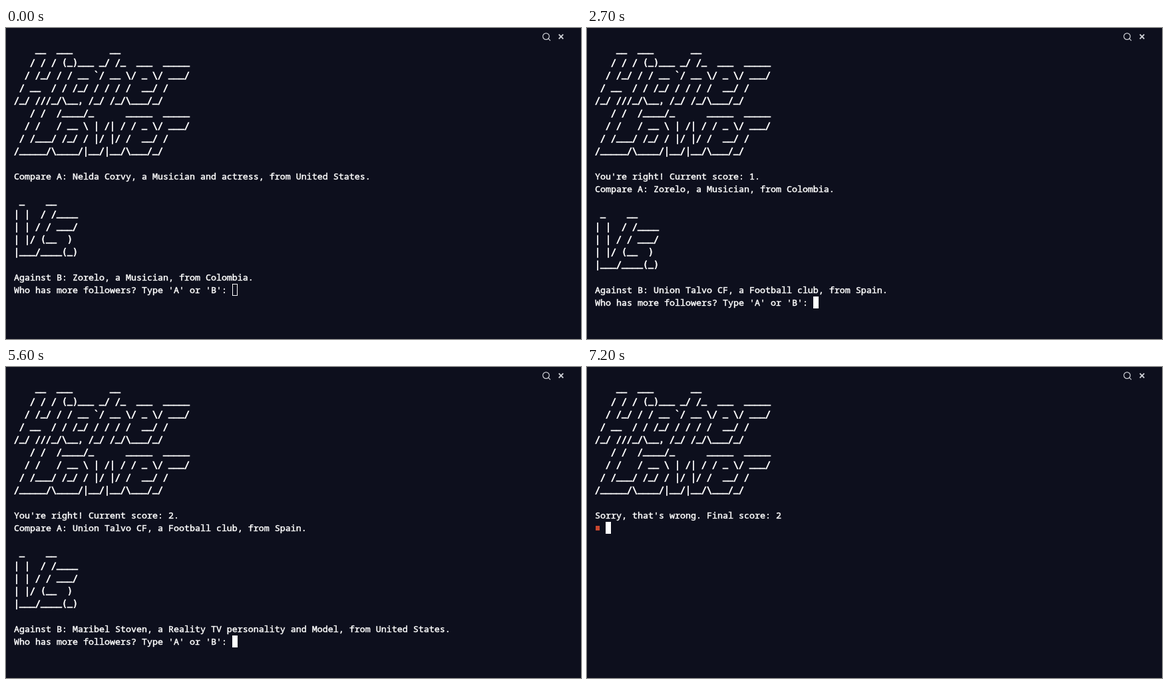
These frames come from a looping animation (864 px wide and 468 px high, 7.3 s). An HTML page:

```html
<!DOCTYPE html>
<html lang="en">
<head>
<meta charset="utf-8">
<title>Higher Lower</title>
<style>
  html, body { margin: 0; width: 100%; height: 100%; overflow: hidden; background: #0d0f1d; }
  #stage { position: relative; width: 864px; height: 468px; overflow: hidden; color: #fff; }
  pre { position: absolute; left: 12px; margin: 0; white-space: pre; font-variant-ligatures: none; }
  .text {
    font: 13.333px/19px "Noto Sans Mono", "DejaVu Sans Mono", monospace;
    -webkit-text-stroke: 0.45px #fff;
  }
  .art {
    font: 13.29px/19px "DejaVu Sans Mono", monospace;
    -webkit-text-stroke: 0.7px #fff;
  }
  .art u {
    position: relative; top: -1px; text-decoration: none;
    font: 13.333px/0 "Noto Sans Mono", monospace;
  }
  #cursor { position: absolute; box-sizing: border-box; width: 8px; height: 18px; border: 1px solid #fff; }
  #mark { position: absolute; left: 13px; top: 239px; width: 6px; height: 7px; background: #c9472f; }
  svg { position: absolute; left: 800px; top: 2px; fill: none; stroke: #d0d2d8; }
</style>
</head>
<body>
<div id="stage">
  <pre class="art" id="title"></pre>
  <pre class="art" id="versus"></pre>
  <pre class="text" id="head"></pre>
  <pre class="text" id="foot"></pre>
  <div id="mark"></div>
  <div id="cursor"></div>
  <svg width="44" height="22">
    <circle cx="11.5" cy="10.6" r="4.8" stroke-width="1.2"/>
    <path d="M15 14.1l3 3" stroke-width="1.2"/>
    <path d="M30.7 7.7l6.6 6.6m0-6.6l-6.6 6.6" stroke-width="1.9"/>
  </svg>
</div>
<script>
const TITLE = String.raw`
    __  ___       __
   / / / (_)___ _/ /_  ___  _____
  / /_/ / / __ ~/ __ \/ _ \/ ___/
 / __  / / /_/ / / / /  __/ /
/_/ ///_/\__, /_/ /_/\___/_/
   / /  /____/_      _____  _____
  / /   / __ \ | /| / / _ \/ ___/
 / /___/ /_/ / |/ |/ /  __/ /
/_____/\____/|__/|__/\___/_/`.slice(1).replace("~", "`");

const VERSUS = String.raw`
 _    __
| |  / /____
| | / / ___/
| |/ (__  )
|___/____(_)`.slice(1);

const LOOP = 7300, LEFT = 12, TOP = 24, CELL = 8, LINE = 19;
const ASK = "Who has more followers? Type 'A' or 'B': ";
const SINGER = "Nelda Corvy, a Musician and actress, from United States.";
const MUSICIAN = "Zorelo, a Musician, from Colombia.";
const CLUB = "Union Talvo CF, a Football club, from Spain.";
const MODEL = "Maribel Stoven, a Reality TV personality and Model, from United States.";

const ROUNDS = [
  { a: SINGER, b: MUSICIAN },
  { a: MUSICIAN, b: CLUB, score: 1 },
  { a: CLUB, b: MODEL, score: 2 },
  { over: "Sorry, that's wrong. Final score: 2" }
];

// [start ms, round, typed answer, terminal has focus]
const STEPS = [
  [0, 0, "", false],
  [700, 0, "", true],
  [2100, 0, "a", true],
  [2700, 1, "", true],
  [4300, 1, "b", true],
  [4600, 2, "", true],
  [6000, 2, "a", true],
  [6400, 3, "", true]
];

const el = id => document.getElementById(id);
const rowY = row => TOP + row * LINE + "px";

function place(id, row, text) {
  el(id).style.top = rowY(row);
  el(id).textContent = text;
}

function placeArt(id, row, art) {
  el(id).style.top = rowY(row);
  el(id).innerHTML = art.replace(/_+/g, "<u>$&</u>");
}

function placeCursor(row, col, solid) {
  const s = el("cursor").style;
  s.left = LEFT + col * CELL + "px";
  s.top = rowY(row);
  s.background = solid ? "#fff" : "none";
}

function show([, index, typed, focus]) {
  const { a, b, score, over } = ROUNDS[index];
  el("mark").hidden = !over;
  el("versus").hidden = !!over;
  if (over) {
    place("head", 10, over);
    place("foot", 11, "");
    placeCursor(11, 2, focus);
    return;
  }
  const shift = score ? 1 : 0;
  const result = score ? `You're right! Current score: ${score}.\n` : "";
  place("head", 10, `${result}Compare A: ${a}`);
  placeArt("versus", 12 + shift, VERSUS);
  place("foot", 18 + shift, `Against B: ${b}\n${ASK}${typed}`);
  placeCursor(19 + shift, ASK.length + typed.length, focus);
}

let current;
const start = performance.now();

function tick() {
  const t = (performance.now() - start) % LOOP;
  const step = STEPS.filter(s => s[0] <= t).pop() || STEPS[0];
  if (step !== current) show(current = step);
  requestAnimationFrame(tick);
}

placeArt("title", 0, TITLE);
tick();
</script>
</body>
</html>
```
